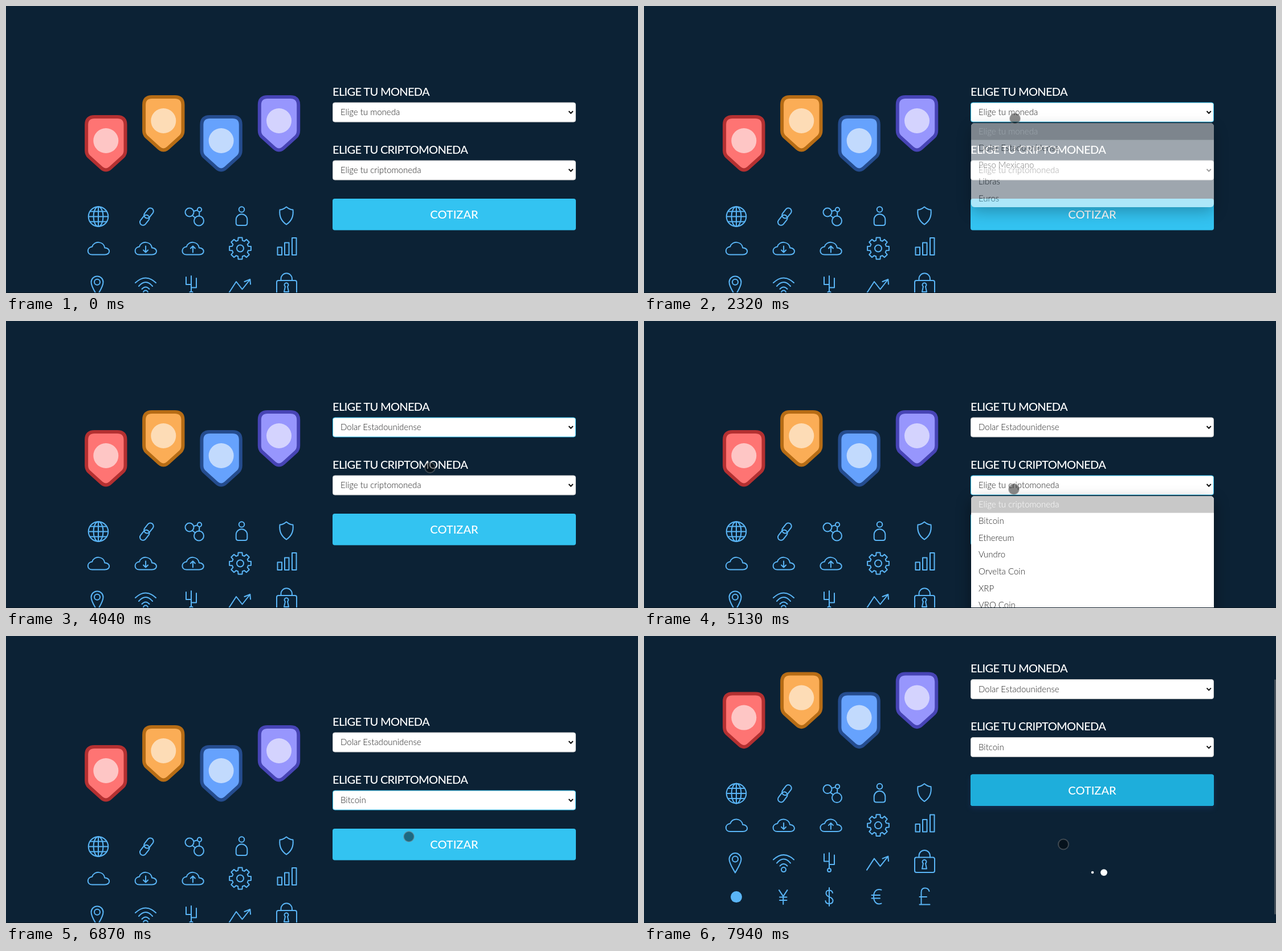
These frames come from a looping animation (1109x505 px, 7990 ms). An HTML page:

```html
<!DOCTYPE html>
<html lang="es">
<head>
<meta charset="utf-8">
<title>Cotizador</title>
<style>
  html, body { margin: 0; width: 100%; height: 100%; overflow: hidden; background: #0c2235; }
  svg { display: block; width: 1109px; height: 505px; }
  text { font-family: Lato, "Open Sans", sans-serif; font-size: 15px; font-weight: 300; fill: #222; }
  .label { font-size: 20px; font-weight: 500; letter-spacing: -.65px; fill: #fff; }
  .cta { font-size: 20px; font-weight: 500; fill: #fff; text-anchor: middle; }
  .icons { fill: none; stroke: #5ab5f6; stroke-width: 2; stroke-linecap: round; stroke-linejoin: round; }
  .field { fill: #fff; stroke: #d1d1d1; }
  .menu { filter: drop-shadow(0 9px 13px rgba(0, 0, 0, .42)); }
</style>
</head>
<body>
<svg viewBox="0 0 1109 505">
  <rect width="1109" height="505" fill="#0c2235"/>
  <g id="page">
    <g id="badges"></g>
    <g class="icons">
      <circle cx="162" cy="370.5" r="17.3"/>
      <ellipse cx="162" cy="370.5" rx="8.5" ry="17.3"/>
      <path d="M162 353V388M145 370.5H179M147.5 361.5H176.5M147.5 379.5H176.5"/>
      <rect x="-10" y="-5.5" width="20" height="11" rx="5.5" transform="translate(250.5 364.5) rotate(-52)"/>
      <rect x="-10" y="-5.5" width="20" height="11" rx="5.5" transform="translate(243.3 376.8) rotate(-52)"/>
      <circle cx="322" cy="363" r="7.5"/>
      <circle cx="339.5" cy="358.3" r="3.7"/>
      <circle cx="338.5" cy="378" r="8.5"/>
      <path d="M329.5 361L336 359.3M327 368.8L332 372.5M339.4 362L339 369.5"/>
      <circle cx="413.5" cy="358" r="4.8"/>
      <path d="M403.7 376a9.8 9.8 0 0 1 19.6 0v6q0 4-4 4h-11.6q-4 0-4-4z"/>
      <path d="M492 353.5q6 5 11.5 5q2 17-11.5 26q-13.5-9-11.5-26q5.5 0 11.5-5z"/>
      <g id="clouds"></g>
      <path id="gear"/>
      <circle cx="411" cy="426.5" r="6"/>
      <path d="M476.5 424.5h7.5v13.5h-7.5zM489 416.5h7.5v21.5h-7.5zM502 408h7.5v30h-7.5z"/>
      <path d="M160 510C157 504 149.5 494 149.5 486a10.5 10.5 0 0 1 21 0C170.5 494 163 504 160 510z"/>
      <circle cx="160" cy="485.8" r="5"/>
      <path d="M227 487Q245 470 263 487M233 493Q245 479 257 493M238.5 498Q245 491 251.5 498"/>
      <circle cx="245" cy="504.5" r="4"/>
      <path d="M325 475V502M316 477V490H325M334 479V495.5H325"/>
      <circle cx="325" cy="505.5" r="3"/>
      <path d="M391 505L404 485L414.5 498.5L428 481.5M418.5 485L428.3 481L429 489.5"/>
      <rect x="475" y="483" width="35" height="26.5" rx="3"/>
      <path d="M482.5 483V480a9.7 9.7 0 0 1 19.4 0V483M490 493.5l-2 9.5h8l-2-9.5a3.5 3.5 0 1 0-4 0z"/>
      <circle cx="162" cy="552.5" r="10" fill="#5ab5f6" stroke="none"/>
      <g transform="translate(0 93.5)">
        <path d="M237 447L244.3 458L251.5 447M244.3 458V472M238 459.5H250.5M238 465H250.5"/>
        <path d="M325 443V475M331 452Q330 447.5 325 447.5Q319 447.5 319.5 453Q320 457 325 459Q331.5 461 331.5 466Q331 471 325 471Q319 471 318.5 466"/>
        <path d="M416.5 446.5C407 443.5 403 451 403 458.5S407 474 416.5 470.5M399.5 456H414M399.5 461.5H414"/>
        <path d="M500.5 449Q499 443.5 493 443.5Q486.5 443.5 486.5 451V472.5M483.5 472.5H501.5M483.5 459H496"/>
      </g>
    </g>
    <text class="label" x="573" y="157.5">ELIGE TU MONEDA</text>
    <text class="label" x="573" y="259.5">ELIGE TU CRIPTOMONEDA</text>
    <g id="fields"></g>
    <g id="button">
      <rect id="glow" x="573" y="343" width="427" height="56" rx="5" fill="#123056" style="filter:blur(4px)"/>
      <rect x="573" y="339" width="427" height="55.5" rx="4" fill="#33c3f1"/>
      <rect id="hover" x="573" y="339" width="427" height="55.5" rx="4" fill="#1eaedb"/>
      <text class="cta" x="786.5" y="374">COTIZAR</text>
    </g>
    <g id="spinner" fill="#fff">
      <circle cx="767" cy="509.5"/><circle cx="787" cy="509.5"/><circle cx="807" cy="509.5"/>
    </g>
    <g id="menus"></g>
  </g>
  <rect id="thumb" x="1106" width="3" height="413" fill="#46515b"/>
  <rect y="504" width="1109" height="1" fill="#081723"/>
  <circle id="cursor" r="9" fill="#000" fill-opacity=".46" stroke="#808080" stroke-opacity=".45" stroke-width="2"/>
</svg>
<script>
const LOOP = 7990, ROW = 29.6;
const $ = id => document.getElementById(id);
const clamp = v => Math.min(1, Math.max(0, v));
const smooth = v => (v = clamp(v), v * v * (3 - 2 * v));
const show = (el, on) => el.setAttribute('opacity', +on);

// [centre x, top, face, rim, emblem]
const badges = [
  [175.3, 192, '#fe7473', '#b43031', '#fec6c5'],
  [276.3, 157, '#fbad56', '#b66c15', '#fddcb6'],
  [377.6, 192, '#66a2fd', '#254c8e', '#c2dafd'],
  [479, 157, '#9796fd', '#4744b5', '#d4d3fe']
];
$('badges').innerHTML = badges.map(([x, y, face, rim, emblem]) => `
  <g transform="translate(${x} ${y})">
    <path d="M-34.2 17Q-34.2 3-20 3H20Q34.2 3 34.2 17V62Q34.2 69 30 73L8 93Q0 100-8 93L-30 73Q-34.2 69-34.2 62Z"
      fill="${face}" stroke="${rim}" stroke-width="6"/>
    <circle cy="45" r="22" fill="${emblem}"/>
  </g>`).join('');

const arrows = ['', 'M0-4V7M-4 3L0 7L4 3', 'M0 7V-4M-4 0L0-4L4 0'];
$('clouds').innerHTML = arrows.map((arrow, i) =>
  `<path transform="translate(${162.3 + i * 82.8} 426.5)"
    d="M-11 11C-21 11-21-2-11-3C-8-14 9-13 11-1C21-1 22 11 11 11Z${arrow}"/>`).join('');

const teeth = [];
for (let k = 0; k < 8; k++)
  for (const [r, a] of [[14.5, -.27], [19.2, -.18], [19.2, .18], [14.5, .27]]) {
    const angle = k * Math.PI / 4 + a;
    teeth.push((411 + r * Math.cos(angle)).toFixed(2) + ' ' + (426.5 + r * Math.sin(angle)).toFixed(2));
  }
$('gear').setAttribute('d', 'M' + teeth.join('L') + 'Z');

const selects = [
  { y: 169.5, open: 2320, hover: 3810, close: 4040, blur: 5080,
    items: ['Elige tu moneda', 'Dolar Estadounidense', 'Peso Mexicano', 'Libras', 'Euros'] },
  { y: 271.5, open: 5080, hover: 6170, close: 6410, blur: 7200,
    items: ['Elige tu criptomoneda', 'Bitcoin', 'Ethereum', 'Vundro', 'Orvelta Coin', 'XRP', 'VRO Coin', 'Solvanto'] }
];
$('fields').innerHTML = selects.map(({ y }) => `
  <g>
    <rect class="field" x="573.5" y="${y + .5}" width="426" height="34" rx="3.5"/>
    <text x="587" y="${y + 22.5}"></text>
    <path d="M987.5 ${y + 15.5}l3.7 3.8l3.7-3.8" fill="none" stroke="#111" stroke-width="2"/>
  </g>`).join('');
$('menus').innerHTML = selects.map(({ y, items }, i) => {
  const top = y + 36.5, box = `x="574" y="${top}" width="426" height="${ROW * items.length}" rx="6"`;
  return `<g class="menu">
    <clipPath id="clip${i}"><rect ${box}/></clipPath>
    <rect ${box} fill="#fff"/>
    <rect class="mark" x="574" width="426" height="${ROW}" fill="#c8c8c8" clip-path="url(#clip${i})"/>
    ${items.map((item, k) => `<text x="587" y="${top + k * ROW + 19.5}">${item}</text>`).join('')}
  </g>`;
}).join('');
selects.forEach((s, i) => {
  const field = $('fields').children[i];
  s.frame = field.querySelector('rect');
  s.value = field.querySelector('text');
  s.menu = $('menus').children[i];
  s.mark = s.menu.querySelector('.mark');
  s.rows = s.menu.querySelectorAll('text');
});

// Pointer moves: start, end, number of steps, points evenly spaced in time
const moves = [
  [1140, 1520, 9, [[990, 487], [760, 330], [590, 205], [509, 164], [490, 158]]],
  [1660, 2130, 10, [[492, 158], [530, 165], [595, 183], [639, 195], [651, 198]]],
  [2770, 3340, 13, [[653, 196], [693, 191], [733, 205], [743, 232], [744, 258]]],
  [4380, 4990, 13, [[741, 260], [715, 272], [675, 288], [653, 295], [649, 296]]],
  [5450, 6030, 13, [[650, 297], [668, 312], [692, 338], [703, 353], [698, 345]]],
  [6870, 7060, 5, [[707, 353], [718, 359], [728, 363], [734, 366], [736, 366.5]]]
];

function stepped(t, start, end, steps) {
  return Math.floor(clamp((t - start) / (end - start)) * (steps - 1) + .2) / (steps - 1);
}

function pointer(t) {
  const move = moves.filter(m => t >= m[0]).pop();
  if (!move) return null;
  const [start, end, steps, points] = move;
  const pos = stepped(t, start, end, steps) * (points.length - 1);
  const i = Math.min(points.length - 2, Math.floor(pos));
  return points[i].map((v, axis) => v + (points[i + 1][axis] - v) * (pos - i));
}

function drawSelect(s, t) {
  const focused = t >= s.open && t < s.blur;
  const isOpen = t >= s.open && t < s.close;
  const active = +(t >= s.hover);
  s.frame.style.stroke = focused ? '#33c3f0' : '';
  s.value.textContent = s.items[+(t >= s.close)];
  show(s.menu, isOpen && (t < s.open + 50 ? .6 : 1));
  s.mark.setAttribute('y', s.y + 36.5 + active * ROW);
  s.rows.forEach((row, k) => row.style.fill = k === active ? '#fff' : '');
}

function drawSpinner(t) {
  show($('spinner'), t >= 7200);
  [...$('spinner').children].forEach((dot, i) => {
    const phase = ((t - 7162 + 320 - i * 160) % 1400 + 1400) % 1400;
    dot.setAttribute('r', 9 * smooth(1 - Math.abs(phase / 560 - 1)));
  });
}

function draw(t) {
  selects.forEach(s => drawSelect(s, t));

  const late = 7200 + 740 * stepped(t, 7200, 7940, 17);
  const press = t < 7200 ? 0 : clamp((late - 7150) / 200);
  show($('glow'), press * .8);
  show($('hover'), press);
  $('button').setAttribute('transform', `translate(0 ${-2 * press})`);
  drawSpinner(t < 7200 ? t : late);

  const scroll = 111 * smooth((late - 7634) / 409);
  $('page').setAttribute('transform', `translate(0 ${-scroll.toFixed(1)})`);
  show($('thumb'), scroll > 0);
  $('thumb').setAttribute('y', scroll * .82);

  const at = pointer(t);
  show($('cursor'), at);
  if (at) $('cursor').setAttribute('transform', `translate(${at})`);
}

const begin = performance.now();
function tick() {
  draw((performance.now() - begin) % LOOP);
  requestAnimationFrame(tick);
}
tick();
</script>
</body>
</html>
```
